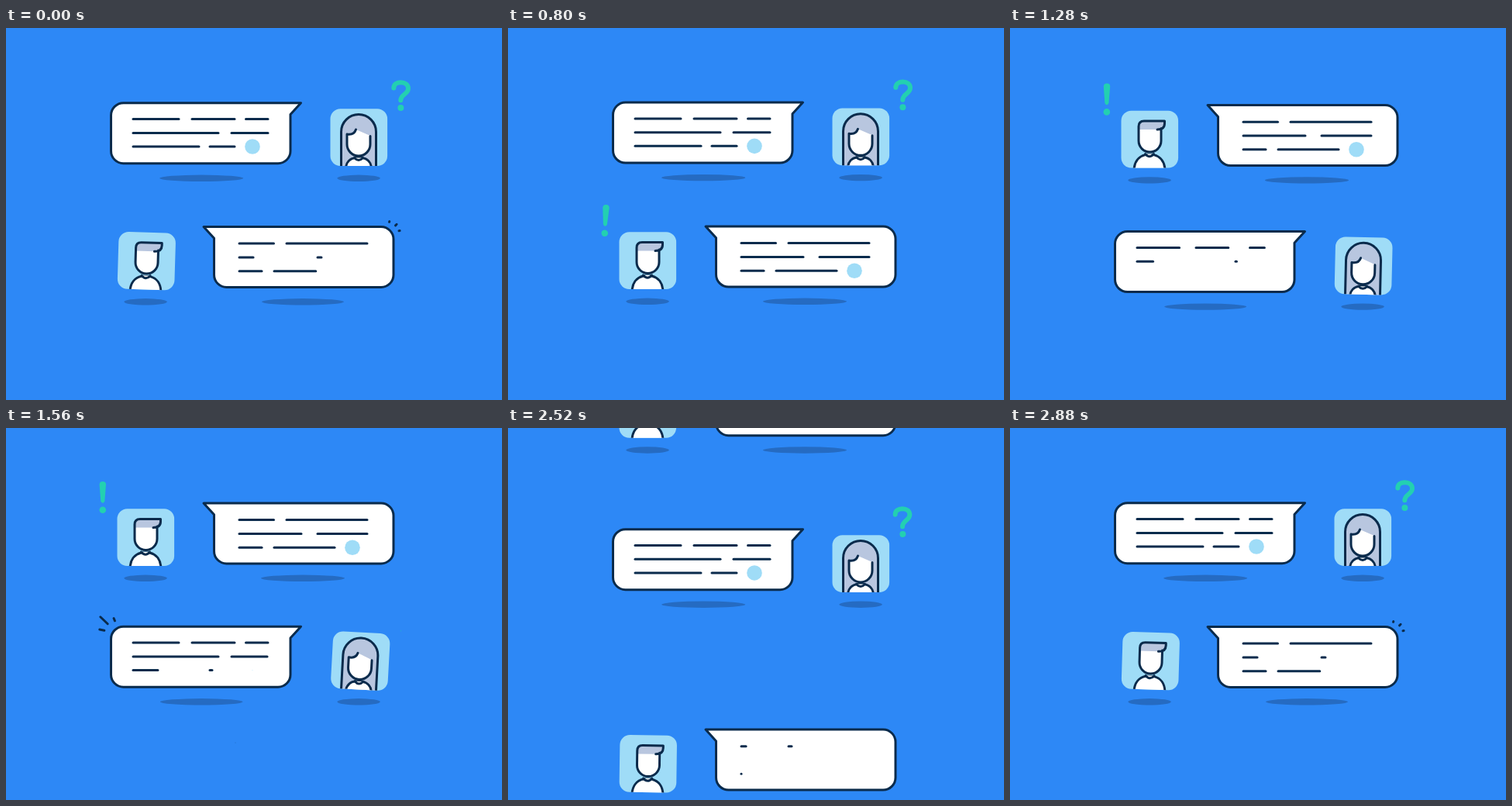
These frames come from a looping animation (640x480 px, 2920 ms). An HTML page with a canvas:

```html
<!DOCTYPE html>
<html lang="en">
<head>
<meta charset="utf-8">
<title>Chat</title>
<style>
  html, body { margin: 0; width: 100%; height: 100%; overflow: hidden; background: #2d88f6; }
  canvas { display: block; }
</style>
</head>
<body>
<canvas id="stage" width="640" height="480"></canvas>
<script>
const ctx = document.getElementById('stage').getContext('2d');

const LOOP = 2920, FRAME = 40, TURN = 1440, ROW_GAP = 159.5;
const BLUE = '#2d88f6', NAVY = '#0a2b4c', SHADE = '#256bc2', SKY = '#9fdcf7',
      HAIR = '#b8c6df', GREEN = '#23d0b1', WHITE = '#fff';

// ---- easing ----
const clamp = x => Math.min(1, Math.max(0, x));
const span = (t, start, length) => clamp((t - start) / length);
const inOut = x => x < 0.5 ? 2 * x * x : 1 - 2 * (1 - x) ** 2;
const backOut = x => 1 + 2.7 * (x - 1) ** 3 + 1.7 * (x - 1) ** 2;
const pop = (t, start, length) => t <= start ? 0 : backOut(span(t, start, length));

// cubic-bezier(.68, 0, .06, 1)
function glide(x) {
  let lo = 0, hi = 1;
  for (let i = 0; i < 24; i++) {
    const u = (lo + hi) / 2, v = 1 - u;
    if (2.04 * u * v * v + 0.18 * u * u * v + u ** 3 < x) lo = u; else hi = u;
  }
  return lo * lo * (3 - 2 * lo);
}

function track(keys, t) {
  if (t <= keys[0][0]) return keys[0][1];
  for (let i = 1; i < keys.length; i++) {
    const [t0, a] = keys[i - 1], [t1, b] = keys[i];
    if (t < t1) return a + (b - a) * inOut((t - t0) / (t1 - t0));
  }
  return keys[keys.length - 1][1];
}

// ---- drawing helpers ----
function shape(path, fill, stroke, width = 3) {
  if (fill) { ctx.fillStyle = fill; ctx.fill(path); }
  if (stroke) { ctx.strokeStyle = stroke; ctx.lineWidth = width; ctx.stroke(path); }
}

function ellipse(x, y, rx, ry, fill) {
  if (rx <= 0) return;
  ctx.fillStyle = fill;
  ctx.beginPath();
  ctx.ellipse(x, y, rx, ry, 0, 0, 7);
  ctx.fill();
}

function line(x0, y0, x1, y1) {
  ctx.strokeStyle = NAVY;
  ctx.lineWidth = 3;
  ctx.beginPath();
  ctx.moveTo(x0, y0);
  ctx.lineTo(x1, y1);
  ctx.stroke();
}

function around(x, y, angle, scale, draw) {
  ctx.save();
  ctx.translate(x, y);
  ctx.rotate(angle * Math.PI / 180);
  ctx.scale(scale, scale);
  ctx.translate(-x, -y);
  draw();
  ctx.restore();
}

// ---- artwork, placed for the upper row ----
const P = d => new Path2D(d);
const bubble = P('M380.5 96.7H151.5A16 16 0 0 0 135.5 112.7V158.7A16 16 0 0 0 151.5 174.7H351A16 16 0 0 0 367 158.7V111.5Z');

const womanArt = {
  hair: P('M432.5 184V134A22.5 22.5 0 0 1 477.5 134V184Z'),
  body: P('M438.5 182C438.5 173 444 168.5 450.5 167.5H459.5C466 168.5 471.5 173 471.5 182Z'),
  collar: P('M449.5 167.5Q455 173.5 460.5 167.5'),
  face: P('M440 137C446 138 450 135.5 451.5 131L470 139V150A15 15 0 0 1 440 150Z'),
  outline: P('M451.5 131C450 135.5 446 138 440 137V150A15 15 0 0 0 470 150V139.5')
};

const manArt = {
  body: P('M160 182C160 170 166 163 174.5 161H185.5C194 163 200 170 200 182Z'),
  collar: P('M174.5 160Q180 166.5 185.5 160'),
  face: P('M166 127H195V143A14.5 14.5 0 0 1 166 143Z'),
  hair: P('M166 128.5V124.5Q166 117.5 173 117.5H199.5V120.5Q199.5 128.5 190 128.5Z'),
  outline: P('M195 127V143A14.5 14.5 0 0 1 166 143V124.5Q166 117.5 173 117.5H199.5V120.5Q199.5 128.5 190 128.5')
};

const hook = P('M500.3 77.5C500.3 72.5 504.5 70.2 509.5 70.2C515 70.2 519 73.2 519 78C519 85.5 509.3 85.5 509.3 93.3');
const bang = P('M120.6 73Q120.6 69 124.8 69Q129 69 129 73L127.3 94.5Q124.8 99 122.3 94.5Z');

function drawWoman() {
  shape(womanArt.hair, HAIR, NAVY);
  shape(womanArt.body, WHITE, NAVY);
  shape(womanArt.collar, WHITE, NAVY);
  shape(womanArt.face, WHITE);
  shape(womanArt.outline, null, NAVY);
}

function drawMan() {
  shape(manArt.body, WHITE, NAVY);
  shape(manArt.collar, WHITE, NAVY);
  shape(manArt.face, WHITE);
  shape(manArt.hair, HAIR);
  shape(manArt.outline, null, NAVY);
}

function question() {
  shape(hook, null, GREEN, 6);
  ellipse(509.4, 103, 4, 4, GREEN);
}

function exclamation() {
  shape(bang, GREEN);
  ellipse(124.8, 105.8, 4.3, 4.3, GREEN);
}

// strokes: x from, x to, y, start time
const woman = {
  flip: false, avatarX: 418.5, portrait: drawWoman,
  mark: question, markX: 509.4, markY: 103, dot: [318, 153],
  strokes: [
    [164, 223, 117.6, 990], [240, 295, 117.6, 1045], [309.5, 338, 117.6, 1068],
    [164, 274, 135.4, 1170], [291, 338, 135.4, 1236],
    [164, 249, 153, 1404], [263, 295, 153, 1482]
  ]
};
const man = {
  flip: true, avatarX: 143.5, portrait: drawMan,
  mark: exclamation, markX: 124.8, markY: 105.8, dot: [447, 154.2],
  strokes: [
    [301, 345.5, 118.6, 986], [362, 466, 118.6, 1030],
    [301, 381, 136.4, 1319], [402, 466, 136.4, 1369],
    [301, 330, 154.2, 1078], [346, 424, 154.2, 1222]
  ]
};

// burst beside the bubble corner: from x, y to x, y, growing time
const ticks = [
  [141, 90.5, 137.5, 82.5, 250],
  [133, 95, 121, 83.5, 150],
  [128.5, 102, 117.5, 100, 200]
];

const tilt = [[1000, 0], [1080, 0.8], [1440, 1.7], [1560, 3.1], [1900, 0]];

function rowY(t) {
  return ROW_GAP + 400 * (1 - glide(span(t, 840, 540)))
    - ROW_GAP * glide(span(t, TURN + 760, 640))
    - 210 * glide(span(t, 2 * TURN + 760, 640));
}

function drawTicks(t) {
  const age = t - 1420;
  for (const [x0, y0, x1, y1, grow] of ticks) {
    const head = span(age, 0, grow), tail = span(age, 110, 200);
    if (head <= tail) continue;
    const dx = x1 - x0, dy = y1 - y0;
    line(x0 + dx * tail, y0 + dy * tail, x0 + dx * head, y0 + dy * head);
  }
}

function drawRow(who, t) {
  const y = rowY(t);
  if (y > 400) return;
  ctx.save();
  ctx.translate(0, y);

  const mid = who.avatarX + 36.8;
  const spread = 1 - 0.02 * clamp((1760 - t) / 320);
  ellipse(who.flip ? 383 : 252.2, 193.8, 54 * spread, 4.2, SHADE);
  ellipse(mid - 0.2, 193.8, 27.8, 4.2, SHADE);

  ctx.save();
  if (who.flip) { ctx.translate(635.5, 0.3); ctx.scale(-1, 1); }
  drawTicks(t);
  shape(bubble, WHITE, NAVY);
  ctx.restore();

  for (const [x0, x1, ly, start] of who.strokes) {
    const p = inOut(span(t, start, 360));
    if (p > 0) line(x0, ly, x0 + (x1 - x0) * p, ly);
  }
  const r = 9.8 * pop(t, 1556, 400);
  ellipse(who.dot[0], who.dot[1], r, r, SKY);

  around(mid, 178, track(tilt, t), 1, () => {
    ctx.beginPath();
    ctx.roundRect(who.avatarX, 104.2, 73.6, 73.8, 13);
    ctx.fillStyle = SKY;
    ctx.fill();
    ctx.clip();
    who.portrait();
  });

  const size = pop(t, 1556, 400);
  if (size > 0) {
    const age = Math.min(t - 1560, 1320);
    const sway = 7 * (1 - age / 1320) ** 1.2 * Math.cos((age - 680) / 560 * 2 * Math.PI);
    around(who.markX, who.markY, sway, size, who.mark);
  }
  ctx.restore();
}

function drawTyping(s) {
  for (let i = 0; i < 3; i++) {
    const r = 6.2 * pop(s, 117 + i * 60, 240) * (1 - inOut(span(s, 500 + i * 50, 160)));
    ellipse(296 + i * 24, 406, r, r, NAVY);
  }
}

function draw(time) {
  const t = Math.floor(time % LOOP / FRAME) * FRAME;
  const turn = Math.floor(t / TURN), s = t % TURN;
  const cast = turn % 2 ? [man, woman] : [woman, man];
  ctx.fillStyle = BLUE;
  ctx.fillRect(0, 0, 640, 480);
  ctx.lineCap = ctx.lineJoin = 'round';
  drawTyping(s);
  drawRow(cast[0], s + 2 * TURN);
  drawRow(cast[1], s + TURN);
  drawRow(cast[0], s);
}

const begin = performance.now();
function tick() {
  draw(performance.now() - begin);
  requestAnimationFrame(tick);
}
tick();
</script>
</body>
</html>
```
